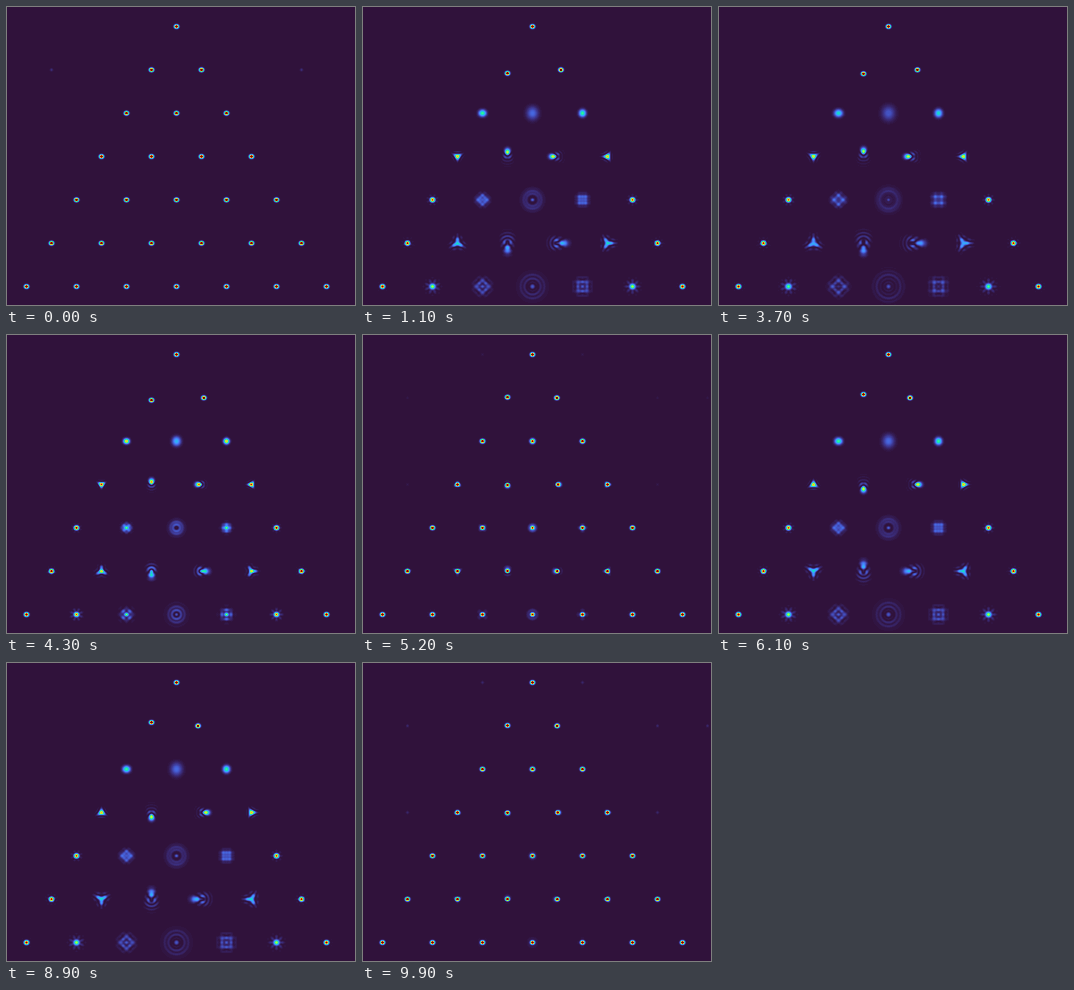
A matplotlib script for the animation above (10 s loop, 350 by 300 pixels).

```python
from math import factorial

import matplotlib.pyplot as plt
import numpy as np
from matplotlib.animation import FuncAnimation

W, H = 350, 300
FRAMES, INTERVAL = 100, 100
ORDERS = 7
PAD, HALF = 30, 25               # canvas margin and patch half-size, px
WAIST_X, WAIST_Y = 0.50, 0.57    # Gaussian beam relative to the pupil
SCALE = 0.61                     # px of focal shift per radian of tilt
STRENGTH = 8.85                  # peak aberration, radians
VMAX = 0.75
BORDER = 0.5

# Pupil plane, y pointing down like the picture
N = 72
u = (np.arange(N) + 0.5) / N * 2 - 1
ux, uy = np.meshgrid(u, u)
rho, theta = np.hypot(ux, uy), np.arctan2(uy, ux)
beam = np.exp(-(ux / WAIST_X) ** 2 - (uy / WAIST_Y) ** 2) * (rho <= 1)
beam /= beam.sum()


def zernike(n, m):
    k = abs(m)
    radial = sum(
        (-1) ** j * factorial(n - j)
        / (factorial(j) * factorial((n + k) // 2 - j) * factorial((n - k) // 2 - j))
        * rho ** (n - 2 * j)
        for j in range((n - k) // 2 + 1)
    )
    return radial * (np.cos(k * theta) if m >= 0 else np.sin(k * theta))


def center(n, m):
    return 170 + 25 * m, 20 + 130 / 3 * n


def kernel(shift):
    """Fourier matrix from pupil samples to pixels around a spot."""
    px = np.arange(-HALF, HALF + 1) + shift
    return np.exp(-1j * np.outer(px / SCALE, u))


def make_mode(n, m):
    x, y = center(n, m)
    col, row = round(x), round(y)
    area = np.s_[row - HALF + PAD:row + HALF + 1 + PAD,
                 col - HALF + PAD:col + HALF + 1 + PAD]
    return area, zernike(n, m), kernel(row - y), kernel(col - x).T


modes = [make_mode(n, m) for n in range(ORDERS) for m in range(-n, n + 1, 2)]

# Faint stray orders, seen only while the spots are nearly in focus
steady = [(1, -5), (1, 5)]
passing = [(0, -2), (0, 2), (1, 7), (3, -5), (3, 5)]
yy, xx = np.mgrid[:H, :W]


def stray(places):
    out = np.zeros((H, W))
    for n, m in places:
        x, y = center(n, m)
        out += np.exp(-((xx - x) ** 2 + (yy - y) ** 2) / 2)
    return out


stray_steady, stray_passing = stray(steady), stray(passing)


def intensity(i):
    s = np.sin(2 * np.pi * i / FRAMES)
    canvas = np.zeros((H + 2 * PAD, W + 2 * PAD))
    for area, z, ky, kx in modes:
        field = ky @ (beam * np.exp(1j * STRENGTH * s * z)) @ kx
        canvas[area] += np.abs(field) ** 2
    img = canvas[PAD:PAD + H, PAD:PAD + W]
    q = abs(s) / 0.063
    fade = np.exp(-(q / 1.8) ** 2)
    return img + fade * (0.03 * stray_steady + 0.03 * min(q, 1) * stray_passing)


def render(i):
    rgb = plt.cm.turbo(np.clip(intensity(i) / VMAX, 0, 1))[..., :3]
    rgb[[0, -1]] = BORDER
    rgb[:, [0, -1]] = BORDER
    return rgb


fig = plt.figure(figsize=(W / 100, H / 100), dpi=100)
ax = fig.add_axes([0, 0, 1, 1])
ax.axis("off")
picture = ax.imshow(render(0), interpolation="nearest", aspect="auto")


def update(i):
    picture.set_data(render(i))
    return [picture]


anim = FuncAnimation(fig, update, frames=FRAMES, interval=INTERVAL,
                     repeat=True, repeat_delay=0)
plt.show()
```
